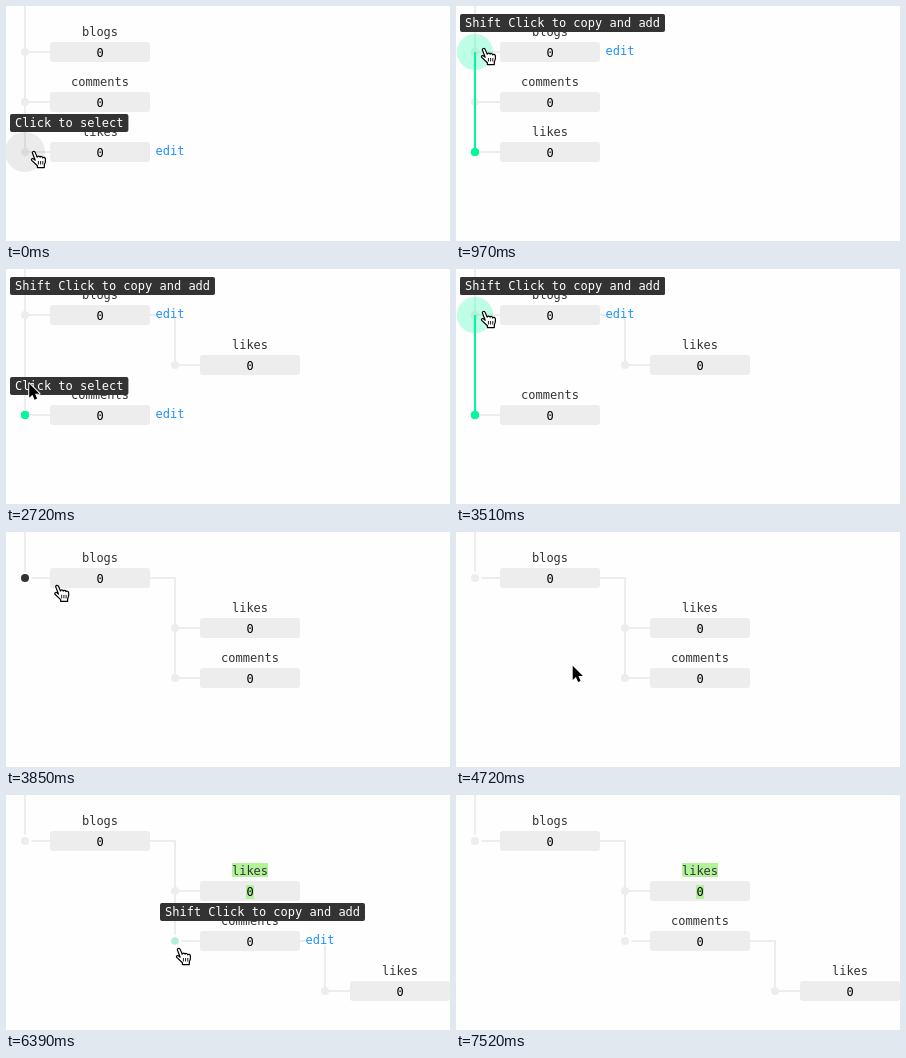
An HTML page for the animation above (7.97 s loop, 444 px wide and 235 px high).

```html
<!DOCTYPE html>
<html lang="en">
<head>
<meta charset="utf-8">
<title>Tree editor</title>
<style>
  html, body { margin: 0; width: 100%; height: 100%; overflow: hidden; background: #fefefe; }
  svg { display: block; width: 444px; height: 235px; }
  text { font: 12px "DejaVu Sans Mono", monospace; white-space: pre; }
</style>
</head>
<body>
<svg id="stage" viewBox="0 0 444 235"></svg>
<script>
const LOOP = 7970, FRAME = 88;
const GRAY = '#ededed', DARK = '#333', GREEN = '#00fa9a', PAPER = '#fefefe', MARK = '#b2f29b';
const stage = document.getElementById('stage');

// The picture moves in bursts and rests between them.
const BURSTS = [
  [80, 520], [970, 1760], [1840, 2370], [2550, 3070], [3510, 4190],
  [4640, 5060], [5330, 6030], [6210, 6570], [6750, 7520]
];

// Each gesture: hover a dot, press it, reach another dot, drop there, tooltip closes.
const GESTURES = [
  { from: [19, 146], to: [19, 46], hover: -300, press: 80, reach: 344, drop: 970, close: 3700 },
  { from: [19, 146], to: [19, 46], hover: 2150, press: 2550, reach: 2990, drop: 3510, close: 3700 },
  { from: [169, 96], to: [169, 146], hover: 4850, press: 5330, reach: 5680, drop: 6210, close: 6830 }
];
const [first, second, third] = GESTURES;
const SETTLE = 100;  // from a drop to the new layout

// Pointer moves: start, end, goal and sideways bow
const START = [28, 146];
const LEGS = [
  { a: 80, b: 520, to: [28, 43], bow: 5 },
  { a: 1350, b: 2220, to: [28, 154], bow: -4 },
  { a: 2550, b: 2980, to: [28, 43], bow: 5 },
  { a: 3720, b: 4190, to: [109, 138], bow: 14 },
  { a: 4640, b: 5060, to: [183, 98], bow: 0 },
  { a: 5240, b: 5757, to: [173, 154], bow: -18 },
  { a: 6750, b: 7520, to: [425, 252], bow: 0 }
];

const within = (t, a, b) => t >= a && t < b;
const clamp = p => Math.min(1, Math.max(0, p));
const ease = p => p * p * (3 - 2 * p);

function snap(t) {
  let now = 0;
  for (const [a, b] of BURSTS) {
    if (t < a) break;
    const gaps = Math.round((b - a) / FRAME), step = (b - a) / gaps;
    now = a + Math.min(gaps, Math.floor((t - a + 6) / step)) * step;
  }
  return now;
}

function pointerAt(t) {
  let [x, y] = START;
  for (const { a, b, to, bow } of LEGS) {
    if (t < a) break;
    const p = clamp((t - a) / (b - a)), e = ease(p);
    const dx = to[0] - x, dy = to[1] - y;
    const side = bow * Math.sin(Math.PI * p) / Math.hypot(dx, dy);
    x += dx * e + dy * side;
    y += dy * e - dx * side;
  }
  return [x, y];
}

const line = (d, color = GRAY) => `<path d="${d}" fill="none" stroke="${color}" stroke-width="2"/>`;
const disc = (x, y, r, fill, alpha = 1) =>
  `<circle cx="${x}" cy="${y}" r="${r}" fill="${fill}" fill-opacity="${alpha}"/>`;
const box = (x, y, w, h, fill, r = 0) =>
  `<rect x="${x}" y="${y}" width="${w}" height="${h}" rx="${r}" fill="${fill}"/>`;
const text = (x, y, s, fill, anchor = 'start') =>
  `<text x="${x}" y="${y}" fill="${fill}" text-anchor="${anchor}">${s}</text>`;

function layout(t) {
  const [moved, nested, copied] = GESTURES.map(g => t > g.drop + SETTLE);
  const held = GESTURES.map(g => within(t, g.press, g.drop + SETTLE));
  const rows = [
    { name: 'blogs', x: 19, y: 46, ring: nested,
      dot: nested && t < second.drop + 600 ? DARK : GRAY },
    { name: 'comments', x: nested ? 169 : 19, y: moved ? 146 : 96, ring: copied,
      dot: held[1] ? GREEN : GRAY },
    { name: 'likes', x: moved ? 169 : 19, y: moved ? 96 : 146,
      dot: held[0] || held[2] ? GREEN : GRAY,
      markName: t > third.reach + 260, markValue: t >= third.drop }
  ];
  const links = [`M19 0V${nested ? 46 : 146}`];
  if (moved) links.push(`M144 46H169V${nested ? 146 : 96}`);
  if (copied) {
    rows.push({ name: 'likes', x: 319, y: 196, dot: GRAY });
    links.push('M294 146H319V196');
  }
  return { rows, links };
}

function row({ name, x, y, markName, markValue }) {
  const mid = x + 75;
  return box(x + 25, y - 10, 100, 20, GRAY, 3) +
    (markName ? box(mid - 18, y - 28, 36, 14, MARK) : '') +
    (markValue ? box(mid - 4, y - 6, 8, 14, MARK) : '') +
    text(mid, y - 16, name, DARK, 'middle') +
    text(mid, y + 5, '0', '#000', 'middle');
}

function halo(t, [x, y], color, alpha, grow, shrink) {
  const r = 20 * Math.min(clamp((t - grow) / 180), clamp(1 - (t - shrink + 25) / 250));
  return r > 0 ? disc(x, y, r, color, alpha) : '';
}

function drag(t, { from, to, press, reach, drop }) {
  if (!within(t, press + 200, drop + SETTLE)) return '';
  const tail = t < reach + 80 ? pointerAt(t - FRAME) : to;
  return line(`M${from}L${tail}`, GREEN);
}

const edit = ([x, y]) =>
  box(x + 131, y - 8, 29, 12, PAPER) + text(x + 130.5, y + 3, 'edit', '#1e90ff');

const tip = ([x, y], label) =>
  box(x - 15, y - 38, (label.length * 7.224 + 10).toFixed(1), 18, DARK, 2) +
  text(x - 10, y - 25, label, '#fff');

function hints(t, g) {
  let out = '';
  if (within(t, g.hover + 60, g.press + 200)) out += edit(g.from) + tip(g.from, 'Click to select');
  if (within(t, g.reach + 80, g.close)) out += edit(g.to) + tip(g.to, 'Shift Click to copy and add');
  return out;
}

function pointer(t) {
  const hand = GESTURES.some(g =>
    within(t, g.hover, g.press + 80) || within(t, g.reach - 100, g.drop + 400));
  const at = `<g transform="translate(${pointerAt(t)})" stroke-linejoin="round">`;
  if (hand) {
    return at + `<path d="M-1.6 1C-1.9-.7.6-1.2 1.3.6L3.2 5.2C3.6 3.6 5.6 3.7 6 5.2
      C6.6 4 8.3 4.3 8.6 5.8C9.6 4.8 11.2 5.4 11.4 7C11.8 10 11.3 11.4 10.3 13V15.6H3.4V13.8
      C1.5 12-.4 10.2-2.3 8.4C-3.2 7 -1.4 6.1-.2 7L1.2 8.2Z" fill="#fff" stroke="#000" stroke-width="1.2"/>
      <path d="M4.4 9V12.5M6.6 9V12.5M8.8 9V12.5" stroke="#000" stroke-width=".9"/></g>`;
  }
  return at + `<path d="M0 0V14.2L3.2 11.2L5.4 16.2L7.9 15.1L5.8 10.2H10.2Z"
    fill="#000" stroke="#fff" stroke-width="2" paint-order="stroke"/></g>`;
}

function draw(t) {
  const { rows, links } = layout(t);
  const each = (list, f) => list.map(f).join('');
  stage.innerHTML =
    each(links, d => line(d)) +
    each(rows, r => line(`M${r.x} ${r.y}h26`) +
      (r.ring ? disc(r.x, r.y, 6.5, PAPER) : '') + disc(r.x, r.y, 4, r.dot)) +
    each(rows, row) +
    each(GESTURES, g => halo(t, g.from, '#000', .075, g.hover, g.press) +
      halo(t, g.to, GREEN, .25, g.reach, g.drop)) +
    each(GESTURES, g => drag(t, g)) +
    each(rows, r => r.dot === GREEN ? disc(r.x, r.y, 4, GREEN) : '') +
    each(GESTURES, g => hints(t, g)) +
    pointer(t);
}

const begin = performance.now();
let shown = -1;
function tick() {
  const t = snap((performance.now() - begin) % LOOP);
  if (t !== shown) draw(shown = t);
  requestAnimationFrame(tick);
}
tick();
</script>
</body>
</html>
```
